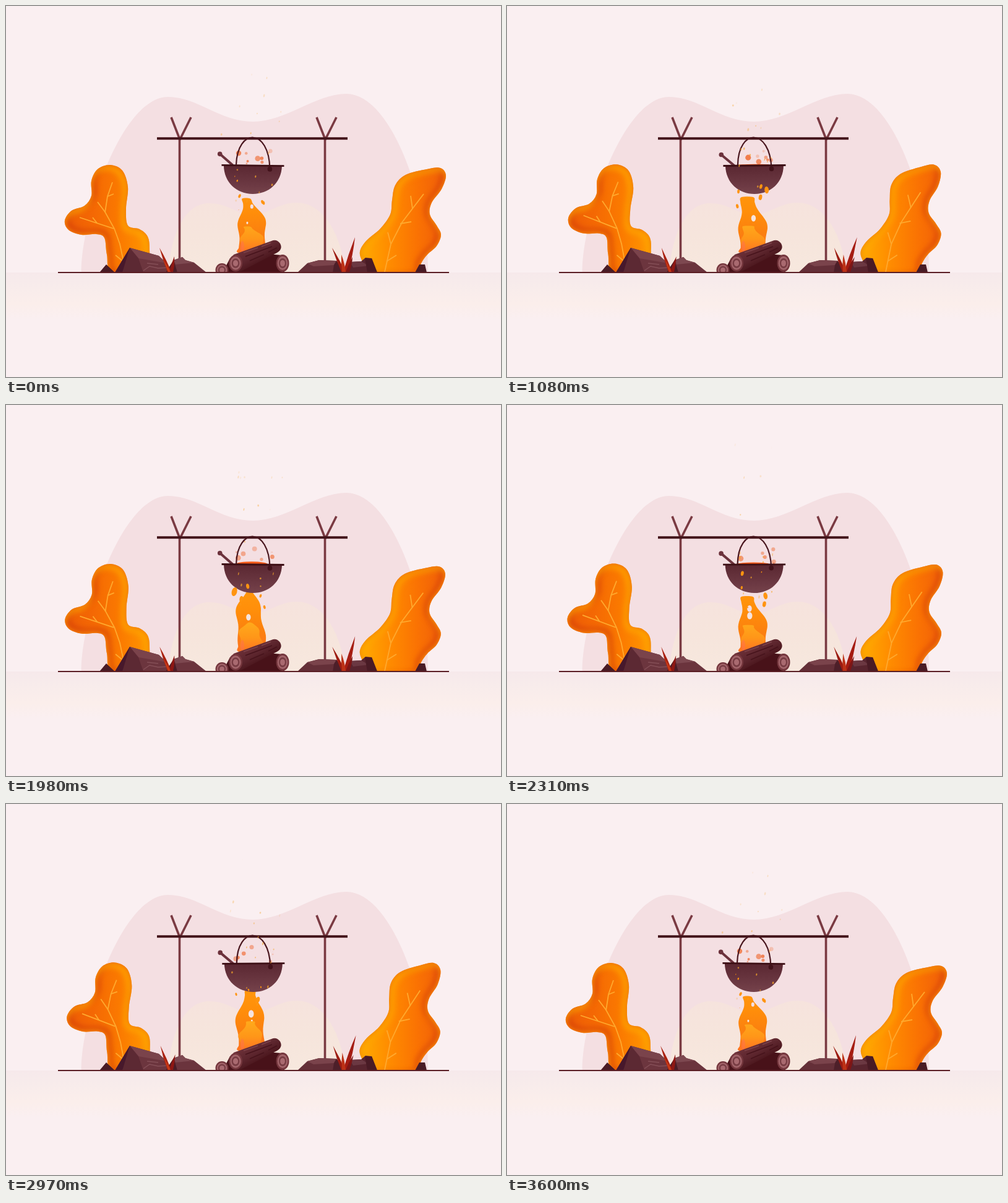
Recreate the animation shown at these times as an HTML page with a canvas. Size 800 by 600 pixels, loop 3630 ms.

```html
<!DOCTYPE html>
<html lang="en">
<head>
<meta charset="utf-8">
<title>Campfire</title>
<style>
html, body { margin: 0; width: 100%; height: 100%; overflow: hidden; background: #faeff1; }
canvas { display: block; width: 800px; height: 600px; }
</style>
</head>
<body>
<canvas id="stage" width="800" height="600"></canvas>
<script>
const ctx = document.getElementById('stage').getContext('2d');
const LOOP = 3600, HOLD = 30, GROUND = 431, TAU = Math.PI * 2;

// "light" points towards the light; below "reach" the leaf bends less than its tip.
const leftLeaf = {
  base: [185, 430], reach: 90, light: [1, -1], span: [95, 232],
  colors: ['#ed5c06', '#f46804', '#fb7b00', '#ff9800'],
  outline: [[172, 436], [163, 402], [159, 375], [146, 369], [122, 370], [101, 362], [95, 347], [106, 331], [127, 323],
    [138, 307], [138, 283], [148, 264], [168, 257], [188, 266], [197, 293], [194, 328], [197, 355], [216, 361], [229, 373], [232, 395], [229, 436]],
  veins: ['193,428 184,385 175,360 160,333 148,317', '160,334 164,308 172,285', '164,308 174,304',
    '174,360 119,342', '147,351 140,342', '188,412 177,403']
};
const rightLeaf = {
  base: [618, 430], reach: 168, light: [-1, -.4], span: [572, 712],
  colors: ['#ffac00', '#ff8c00', '#fa7203', '#ee5c0a'],
  outline: [[590, 436], [576, 413], [572, 397], [582, 380], [605, 360], [621, 337], [624, 314], [629, 290], [646, 273],
    [680, 264], [702, 262], [711, 274], [704, 296], [688, 318], [685, 337], [696, 355], [703, 370], [696, 388], [681, 402], [671, 416], [662, 436]],
  veins: ['612,430 622,385 640,350 675,304', '654,307 657,328', '637,352 655,349', '617,366 622,385', '615,413 631,403']
};

const clamp = v => Math.max(0, Math.min(1, v));
const mix = (a, b, u) => a + (b - a) * u;

function random(seed) {
  const n = Math.sin(seed * 127.1 + 11.7) * 43758.5453;
  return n - Math.floor(n);
}

function smooth(points) {
  const path = new Path2D(), n = points.length, at = i => points[(i + n) % n];
  path.moveTo(...points[0]);
  for (let i = 0; i < n; i++) {
    const [a, b, c, d] = [at(i - 1), at(i), at(i + 1), at(i + 2)];
    path.bezierCurveTo(b[0] + (c[0] - a[0]) / 6, b[1] + (c[1] - a[1]) / 6,
      c[0] - (d[0] - b[0]) / 6, c[1] - (d[1] - b[1]) / 6, ...c);
  }
  return path;
}

function gradient(x0, y0, x1, y1, ...colors) {
  const g = ctx.createLinearGradient(x0, y0, x1, y1);
  colors.forEach((c, i) => g.addColorStop(i / (colors.length - 1), c));
  return g;
}

function fill(shape, color) {
  ctx.fillStyle = color;
  ctx.fill(typeof shape === 'string' ? new Path2D(shape) : shape);
}

function stroke(shape, color, width) {
  ctx.strokeStyle = color;
  ctx.lineWidth = width;
  ctx.stroke(typeof shape === 'string' ? new Path2D(shape) : shape);
}

function ellipse(x, y, rx, ry, color, turn = 0) {
  ctx.beginPath();
  ctx.ellipse(x, y, rx, ry, turn, 0, TAU);
  ctx.fillStyle = color;
  ctx.fill();
}

// Staggered particles, each reborn with new random numbers; "life" must divide the loop.
function particles(count, life, t, paint) {
  for (let i = 0; i < count; i++) {
    const age = t / life + random(i + life);
    const birth = Math.floor(age) % (LOOP / life);
    paint(age % 1, k => random(i * 7.3 + birth * 31.7 + k * 3.1 + life));
  }
  ctx.globalAlpha = 1;
}

function drawBackdrop() {
  ctx.fillStyle = '#faeff1';
  ctx.fillRect(0, 0, 800, 600);
  fill('M122 431C121 350 185 147 262 147C310 147 345 187 399 187C453 187 500 142 550 142C627 142 685 330 682 431Z', '#f4dfe2');
  fill('M262 431C268 360 293 319 328 319C360 319 374 338 398 338C422 338 440 318 470 318C510 318 542 365 548 431Z',
    gradient(0, 318, 0, 431, '#f6e3dd', '#f6e5dc', '#f7e8de'));
  ctx.fillStyle = gradient(0, 431, 0, 508, '#f6e9eb', '#f8eceb', '#fbeeeb', '#faeff1');
  ctx.fillRect(0, 431, 800, 77);
  stroke('M280.5 214V412M515.5 214V412M267 180L281 216L299 180M502 180L516 216L534 180', '#7a3a42', 3.6);
  stroke('M244 214.3H552', '#43141a', 4);
}

function drawLeaf({ base, reach, light, span, colors, outline, veins }, angle) {
  const bend = ([x, y]) => {
    const a = angle * clamp((430 - y) / reach);
    const dx = x - base[0], dy = y - base[1];
    return [base[0] + dx * Math.cos(a) - dy * Math.sin(a), base[1] + dx * Math.sin(a) + dy * Math.cos(a)];
  };
  const shape = smooth(outline.map(bend));
  const rim = (offset, color, width) => {
    ctx.save();
    ctx.translate(light[0] * offset, light[1] * offset);
    stroke(shape, color, width);
    ctx.restore();
  };
  ctx.save();
  ctx.beginPath();
  ctx.rect(0, 0, 800, GROUND);
  ctx.clip();
  fill(shape, gradient(span[0], 0, span[1], 0, ...colors));
  ctx.clip(shape);
  ctx.filter = 'blur(5px)';
  rim(4, 'rgba(205,55,12,.7)', 7);
  rim(-4, 'rgba(255,170,0,.8)', 8);
  ctx.restore();
  for (const vein of veins) {
    const path = new Path2D();
    vein.split(' ').forEach(p => path.lineTo(...bend(p.split(',').map(Number))));
    stroke(path, '#ffa92e', 1.8);
  }
}

function drawRocks() {
  fill('M151 431L162 418L176 431ZM661 431L668 418L677 418L680 431Z', '#491b25');
  fill('M176 431L200 391L247 404L272 431Z', '#6c353e');
  fill('M176 431L200 391L203 402L188 431Z', '#47182b');
  fill('M200 391L247 404L260 416L214 408Z', '#7a434b');
  fill('M200 391L214 408L222 431H188Z', '#5c2933');
  stroke('M222 428L232 421L246 424L262 423M228 416L246 418', '#854f57', 1.5);
  fill('M258 431L271 411L285 406L290 411L304 415L324 431Z', '#6b343d');
  fill('M271 411L285 406L290 411L304 415L274 418Z', '#7d4850');
  fill('M258 431L271 411L277 431Z', '#4a1d27');
  fill('M471 431L487 416L506 411L534 412L550 431Z', '#642f38');
  fill('M487 416L506 411L534 412L530 419L497 421Z', '#7a434b');
  fill('M534 412L550 431H528L530 419Z', '#4d1f29');
  fill('M551 431L556 414L574 413L581 407L591 408L600 431Z', '#58252f');
  fill('M556 414L574 413L586 420L561 423Z', '#6b3842');
  fill('M591 408L600 431H584L580 408Z', '#491b25');
}

function drawGrass(lean) {
  const blade = (x, tipX, tipY, width, color) => {
    const midX = mix(x, tipX, .5), midY = mix(430, tipY, .5);
    fill(`M${x - width} 430Q${midX - width} ${midY} ${tipX + lean} ${tipY}Q${midX + width} ${midY} ${x + width} 430Z`, color);
  };
  blade(264, 249, 391, 3, '#a9200f');
  blade(267, 273, 405, 3, '#8d1713');
  blade(264, 255, 410, 2, '#c63a18');
  blade(545, 528, 391, 3, '#9c1b11');
  blade(549, 565, 374, 4, '#a51c12');
  blade(546, 543, 402, 3, '#bd3216');
  blade(552, 561, 406, 3, '#7d1616');
}

function drawFlame(t) {
  const beat = TAU * t / 600, levels = 12;
  const top = 306 + 6 * Math.sin(TAU * t / 1200 + 1.2);
  const edge = side => Array.from({ length: levels }, (_, k) => {
    const s = k / (levels - 1);
    const half = 20 + 3 * Math.sin(s * 3) - 14 * s ** 3;
    const drift = s * 4 * Math.sin(s * 4 - beat / 2);
    const ripple = (1 + 3 * s) * Math.sin(s * 11 - beat + side * 1.1);
    return [397 - 4 * s * s + drift + side * half + ripple, mix(399, top, s)];
  });
  const shape = smooth([...edge(-1), ...edge(1).reverse()]);
  const body = new Path2D(shape);
  particles(2, 900, t, (u, rnd) => {
    const r = 4.5 * Math.sin(Math.PI * u), x = mix(388, 400, rnd(1)), y = 355 - 38 * u;
    body.moveTo(x + r, y);
    body.ellipse(x, y, r, r * 1.4, 0, 0, TAU);
  });
  ctx.fillStyle = gradient(0, 300, 0, 400, '#ff960c', '#ff8e0a', '#fb800f', '#ff7420');
  ctx.fill(body, 'evenodd');
  ctx.save();
  ctx.translate(398, 399);
  ctx.scale(.83, .48);
  ctx.translate(-398, -399);
  fill(shape, gradient(0, 305, 0, 399, '#ffa81b', '#ff9618', '#ff7423'));
  ctx.restore();
  ellipse(382, 389, 3, 9, 'rgba(255,112,80,.5)');
}

function ring(x, y, rx, ry) {
  ['#74363d', '#a2646a', '#773c43', '#a96a70'].forEach((color, i) => ellipse(x, y, rx * (1 - i * .21), ry * (1 - i * .21), color));
}

function drawLogs() {
  ctx.save();
  ctx.beginPath();
  ctx.rect(0, 0, 800, GROUND);
  ctx.clip();
  fill('M350 431L362 408L410 400L446 403L450 431Z', '#481219');
  ring(349, 427, 10.5, 11);
  ring(447, 416, 10.5, 14);
  fill('M368 402L429 380Q437 376 443 384Q448 393 438 399L380 429Q362 432 360 415Z',
    gradient(395, 388, 412, 418, '#6b2f37', '#5c252d', '#471319'));
  stroke('M387 405L430 389M394 412L417 402M424 398L438 391', '#46131b', 1.5);
  stroke('M384 399L407 391M413 389L428 383', '#7c434b', 1.5);
  ring(371, 416, 11, 13.5);
  ctx.restore();
}

function drawBubbles(t) {
  particles(8, 900, t, (u, rnd) => {
    const size = (1.8 + 3.4 * rnd(1)) * Math.sin(Math.PI * u) ** .5;
    ctx.globalAlpha = (.5 + .4 * rnd(2)) * Math.min(1, 3 - 3 * u);
    ellipse(mix(368, 434, rnd(3)), 258 - u * (12 + 24 * rnd(4)), size, size, '#f0703a');
  });
}

function drawPot(angle, t) {
  ctx.save();
  ctx.translate(399, 212);
  ctx.rotate(angle);
  ctx.translate(-399, -212);
  ellipse(398, 257, 25, 4 * Math.max(0, -Math.cos(TAU * t / LOOP)), '#f35a18');
  stroke('M346 240L367 258', '#6c323c', 4);
  ellipse(346, 240, 3.8, 3.8, '#6c323c');
  fill('M352.5 258H446.5C446 286 425 304 399.5 304S353 286 352.5 258Z',
    gradient(0, 258, 0, 304, '#5a2731', '#67343e', '#75424b'));
  stroke('M372.5 257C374 197 425 197 427 263', '#49161e', 2.2);
  stroke('M349 258H450', '#3d0f15', 2.8);
  ellipse(427, 263.5, 3.8, 4, '#42121a');
  ctx.restore();
}

function drawSparks(t) {
  // Tongues torn off the flame
  particles(6, 600, t, (u, rnd) => {
    const size = Math.sin(Math.PI * u) * (.6 + .9 * rnd(1));
    ellipse(mix(366, 420, rnd(2)), 332 - u * (25 + 50 * rnd(3)), 3 * size, 5 * size, '#ff9410', rnd(4) - .5);
  });
  // Embers drifting up past the bar
  particles(16, 1800, t, (u, rnd) => {
    const x = 394 + (rnd(1) - .5) * (60 + 50 * u) + 5 * Math.sin(u * 9 + rnd(2) * 6);
    ctx.globalAlpha = Math.min(1, u * 6) * (1 - u);
    ellipse(x, 325 - u * (150 + 140 * rnd(3)), .7 + rnd(4) * .8, 1.1 + rnd(5) * 1.5, '#f6a52a', .2);
  });
}

function draw(t) {
  const phase = Math.cos(TAU * t / 1800), sway = (1 - phase) / 2;
  drawBackdrop();
  drawLeaf(leftLeaf, .058 * sway);
  drawLeaf(rightLeaf, -.075 * sway);
  drawRocks();
  drawGrass(-phase);
  drawFlame(t);
  drawLogs();
  drawBubbles(t);
  drawPot(.012 * phase, t);
  drawSparks(t);
  stroke('M84 431H716', '#5a1e24', 2);
}

function tick() {
  const now = performance.now() % (LOOP + HOLD);
  draw(Math.floor(now / HOLD) * HOLD % LOOP);
  requestAnimationFrame(tick);
}
tick();
</script>
</body>
</html>
```
